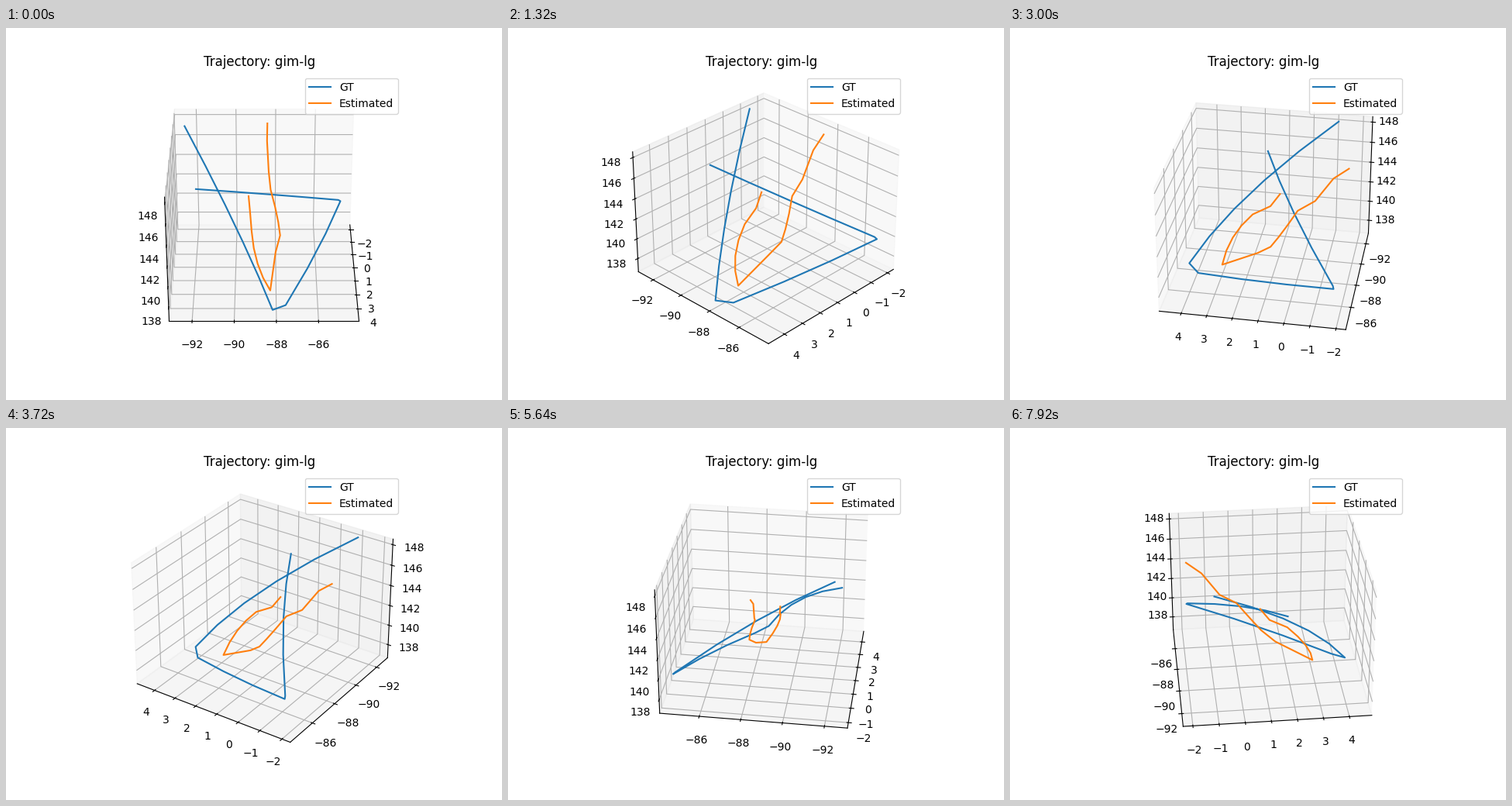
These frames come from a looping animation (640x480 px, 8 s). A matplotlib script:

```python
import numpy as np
import matplotlib.pyplot as plt
from matplotlib.animation import FuncAnimation

TICK_MS = 40          # animation interval
TICKS_PER_STEP = 3    # the camera moves every 120 ms
TICKS = 200           # 8 s loop
DEG_PER_STEP = 4
STRAIGHT = (0, 0, 0)


def leg(start, end, steps, bow):
    """Points from start up to, but without, end; bow bends the middle."""
    start, end, bow = map(np.array, (start, end, bow))
    t = np.arange(steps)[:, None] / steps
    return start + (end - start) * t + bow * t * (1 - t)


def path(legs, end):
    """Join legs given as (start, steps, bow)."""
    stops = [start for start, _, _ in legs[1:]] + [end]
    parts = [leg(start, stop, steps, bow)
             for (start, steps, bow), stop in zip(legs, stops)]
    return np.vstack(parts + [end])


gt = path([
    ((-1.06, -92.517, 148.30), 5, (2.24, 1.30, 0)),
    ((4.407, -88.179, 137.09), 1, STRAIGHT),
    ((3.929, -87.548, 136.88), 3, (0, 0.58, 0.2)),
    ((-1.809, -84.653, 139.86), 1, STRAIGHT),
    ((-1.77, -84.767, 140.03), 4, (0.87, 0, 1.19)),
], end=(1.717, -91.862, 145.42))

estimated = path([
    ((-1.91, -88.419, 147.63), 2, (-0.2, -0.2, 2.33)),
    ((-0.636, -88.354, 144.31), 1, STRAIGHT),
    ((0.033, -88.26, 143.30), 3, (0.15, 0.3, -0.8)),
    ((1.036, -87.79, 139.97), 2, (-1.88, 0.08, 1.7)),
    ((3.072, -88.285, 137.14), 4, (0.85, -0.64, 0)),
    ((1.954, -89.19, 141.59), 1, STRAIGHT),
    ((1.249, -89.266, 142.49), 1, STRAIGHT),
], end=(0.878, -89.342, 143.70))

fig = plt.figure(figsize=(6.4, 4.8), dpi=100)
ax = fig.add_subplot(projection="3d")
ax.plot(*gt.T, label="GT")
ax.plot(*estimated.T, label="Estimated")
ax.set_title("Trajectory: gim-lg", x=0.498)
ax.legend()

ax.set_xticks(range(-2, 5))
ax.set_yticks(range(-92, -85, 2))
ax.set_zticks(range(138, 149, 2))
ax.set_xlim(-2.37, 4.867)
ax.set_ylim(-93.09, -84.08)
ax.set_zlim(136.64, 148.54)


def update(tick):
    ax.view_init(elev=30, azim=DEG_PER_STEP * (tick // TICKS_PER_STEP))
    return ()


anim = FuncAnimation(fig, update, frames=TICKS, interval=TICK_MS,
                     repeat=True, repeat_delay=0, blit=False)
plt.show()
```
